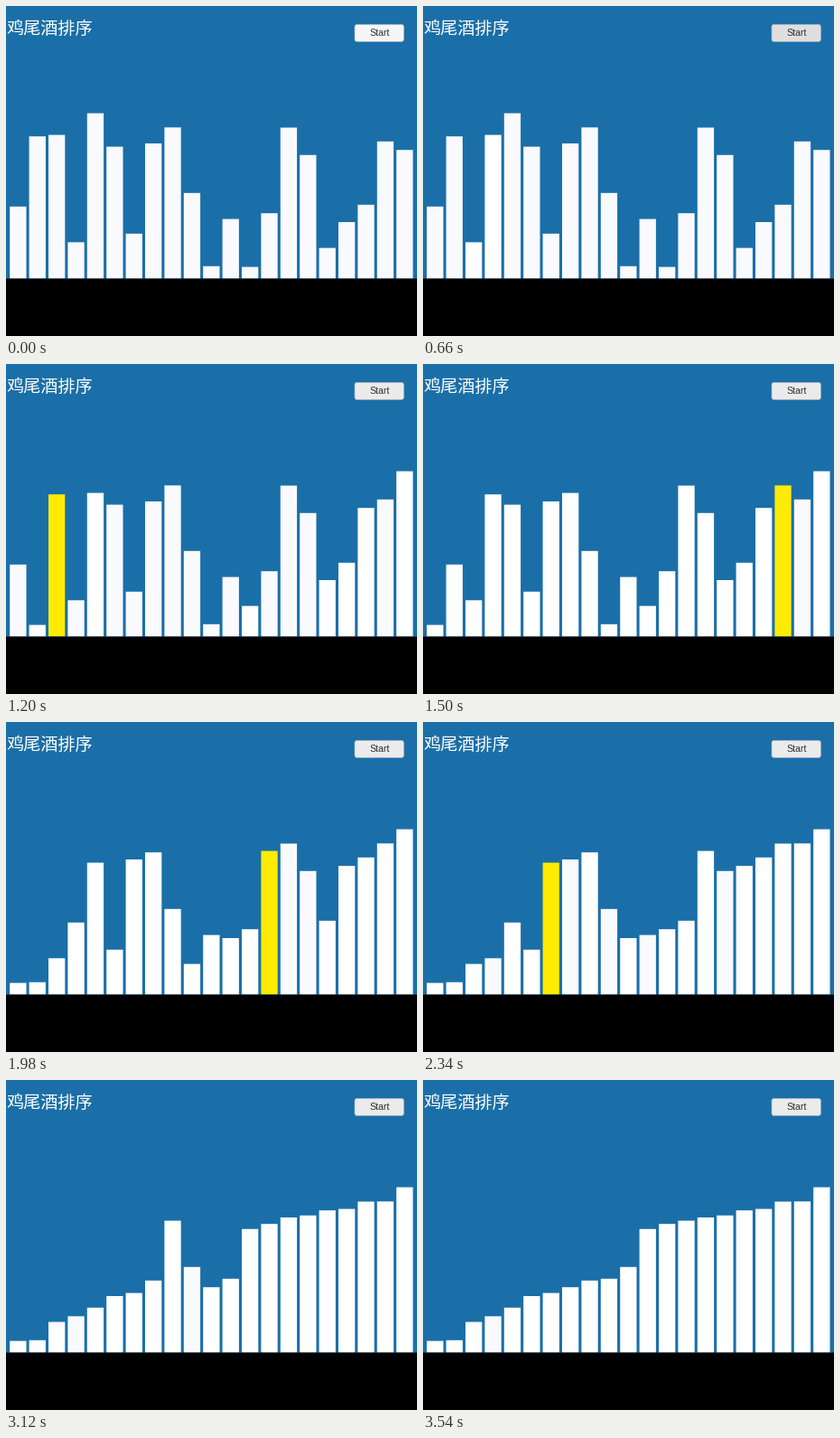
These frames come from a looping animation (455 by 365 pixels, 5.16 s). A matplotlib script:

```python
import math

import numpy as np
import matplotlib.pyplot as plt
from matplotlib.animation import FuncAnimation
from matplotlib.patches import FancyBboxPatch, Rectangle

W, H, DPI = 455, 365, 80
FRAMES, INTERVAL = 86, 60
PT = 72 / DPI  # points per pixel

BLUE, YELLOW = "#1a6fa8", "#ffeb04"
SOFT_WHITE, WHITE = "#f9fafe", "#ffffff"
GROUND = 301.5
LEFT, PITCH, BAR_WIDTH = 4.2, 21.4, 18.3

TOPS = [221.8, 144.2, 142.6, 261.3, 118.6, 155.6, 251.8, 152.0, 134.3, 206.8,
        287.8, 235.6, 288.6, 229.2, 134.5, 164.8, 267.6, 239.0, 219.8, 149.8,
        159.2]
START = [GROUND - top for top in TOPS]

# Pace of the sort: number of comparisons done at a given frame.
PACE_FRAMES = [10, 11, 20, 25, 33, 46, 58, 59]
PACE_STEPS = [0, 4, 38, 56, 85, 134, 178, 182]
CLICK_FRAME = 11


def cocktail_states(values):
    """Return (heights, highlighted slot) after every comparison."""
    values = list(values)
    states = [(values[:], None)]

    def compare(j):
        swapped = values[j] > values[j + 1]
        if swapped:
            values[j], values[j + 1] = values[j + 1], values[j]
        states.append((values[:], j + 1 if swapped else None))

    low, high = 0, len(values) - 1
    while low < high:
        for j in range(low, high):
            compare(j)
        high -= 1
        for j in range(high - 1, low - 1, -1):
            compare(j)
        low += 1
    return states


def button_color(frame):
    if frame < CLICK_FRAME:
        return "#f6f6f6"
    return "#dfdfdf" if frame == CLICK_FRAME else "#ebebeb"


STATES = cocktail_states(START)

fig = plt.figure(figsize=(W / DPI, H / DPI), dpi=DPI, facecolor=BLUE)
ax = fig.add_axes([0, 0, 1, 1])
ax.set_xlim(0, W)
ax.set_ylim(H, 0)
ax.axis("off")

bars = [
    ax.add_patch(Rectangle((LEFT + PITCH * i, GROUND - h), BAR_WIDTH, h,
                           lw=0, snap=False))
    for i, h in enumerate(START)
]
ax.add_patch(Rectangle((0, GROUND), W, H - GROUND, color="black", lw=0,
                       snap=False))

button = ax.add_patch(FancyBboxPatch(
    (386, 20.4), 54.4, 19, boxstyle="round,pad=0,rounding_size=2.5",
    ec="#a9b4bc", lw=0.6 * PT))
ax.text(413.2, 33.4, "Start", family="Liberation Sans", size=10.5 * PT,
        color="#323232", ha="center", va="baseline")
ax.text(0, 31.2, "鸡尾酒排序", family="Noto Sans CJK JP", size=19.2 * PT,
        color="white", ha="left", va="baseline")


def update(frame):
    step = math.ceil(np.interp(frame, PACE_FRAMES, PACE_STEPS) - 1e-6)
    heights, marked = STATES[step]
    for i, (bar, height) in enumerate(zip(bars, heights)):
        bar.set_y(GROUND - height)
        bar.set_height(height)
        resting = SOFT_WHITE if height == START[i] else WHITE
        bar.set_facecolor(YELLOW if i == marked else resting)
    button.set_facecolor(button_color(frame))
    return [*bars, button]


anim = FuncAnimation(fig, update, frames=FRAMES, interval=INTERVAL,
                     repeat=True, repeat_delay=0, blit=False)
plt.show()
```
